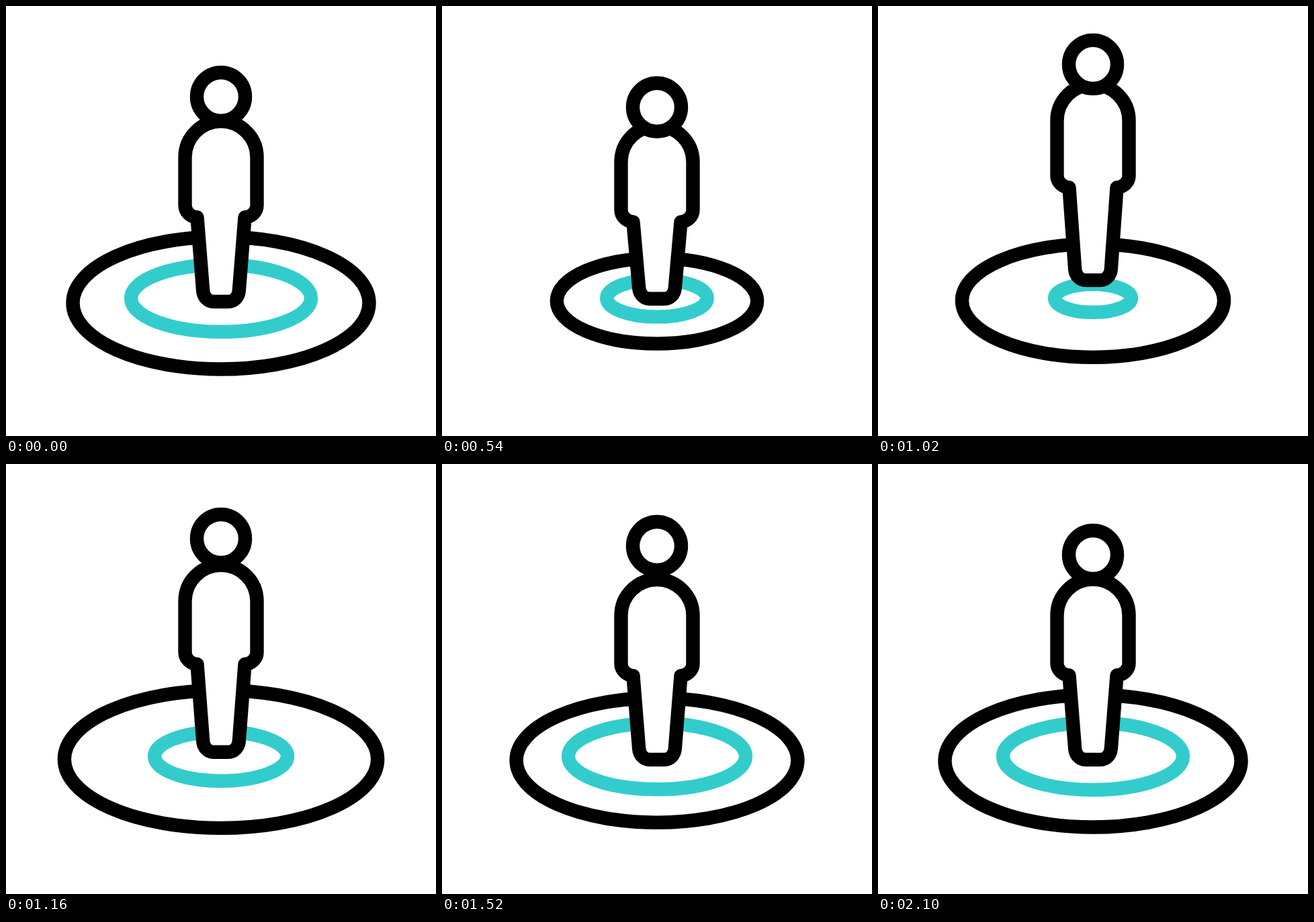
Write an HTML page that moves like this. It is 640 by 640 pixels and loops after 3000 ms.

```html
<!DOCTYPE html>
<html lang="en">
<head>
<meta charset="utf-8">
<title>Jumping figure</title>
<style>
  html, body { margin: 0; width: 100%; height: 100%; overflow: hidden; background: #fff; }
  svg { display: block; width: 100vw; height: 100vh; }
</style>
</head>
<body>
<svg viewBox="0 0 640 640" fill="#fff" stroke="#000" stroke-width="20.4" stroke-linejoin="round">
  <ellipse id="outer" cx="320"/>
  <ellipse id="inner" cx="320" cy="435" stroke="#33cccc"/>
  <path id="body"/>
  <circle id="head" cx="320" r="36"/>
</svg>
<script>
const LOOP = 3000;
const [outer, inner, body, head] =
  ['outer', 'inner', 'body', 'head'].map(id => document.getElementById(id));

function set(el, attrs) {
  for (const name in attrs) el.setAttribute(name, attrs[name]);
}

function bodyPath(shoulder, waist, sole) {
  const arm = waist - 17.5;
  return `M284.5 ${waist}C274.5 ${waist - 0.5} 266.5 ${arm + 9} 266.5 ${arm}
    V${shoulder}A53.5 53.5 0 0 1 373.5 ${shoulder}V${arm}
    C373.5 ${arm + 9} 365.5 ${waist - 0.5} 355.5 ${waist}
    L346.8 ${sole - 16}C346 ${sole - 7} 339.5 ${sole} 331 ${sole}H309
    C300.5 ${sole} 294 ${sole - 7} 293.2 ${sole - 16}Z`;
}

function draw(t) {
  // eased 0 to 1 between two times in ms
  const ramp = (from, to) => {
    const u = Math.min(1, Math.max(0, (t - from) / (to - from)));
    return u * u * (3 - 2 * u);
  };

  // figure: crouch, leap, land, settle
  const crouch = ramp(90, 460), leap = ramp(460, 960);
  const land = ramp(960, 1300), settle = ramp(1300, 1640);
  const shoulder = 225 + 12 * crouch - 72 * leap + 61.5 * land - 1.5 * settle;
  const waist = 314.5 + 11 * crouch - 59.6 * leap + 50.6 * land - 2 * settle;
  const sole = 440 - 42 * (ramp(460, 870) - ramp(890, 1300));
  set(body, { d: bodyPath(shoulder, waist, sole) });
  set(head, {
    cy: 135 + 28 * crouch - 86 * ramp(460, 800) + 47.5 * ramp(905, 1300)
      - 4.5 * ramp(1300, 1720) + 15 * ramp(1720, 2100)
  });

  // rings: shrink, swell on landing, recoil, settle
  const shrink = ramp(130, 920), swell = ramp(920, 1082);
  const recoil = ramp(1082, 1340), rest = ramp(1340, 1640);
  const rx = 220.5 - 134.5 * shrink + 160 * swell - 57.5 * recoil + 32 * rest;
  const drop = -5.7 * shrink + 3.2 * swell - 0.5 * recoil + 3 * rest;
  set(outer, { rx, ry: 0.46 * rx + 0.69 * drop - 2.9, cy: 442 + drop });

  const irx = 134 - 101 * ramp(100, 890) + 95 * ramp(870, 1330) + 6 * ramp(1330, 1640);
  set(inner, { rx: irx, ry: 0.377 * irx - 0.5 });
}

const start = performance.now();
function tick() {
  draw((performance.now() - start) % LOOP);
  requestAnimationFrame(tick);
}
tick();
</script>
</body>
</html>
```
